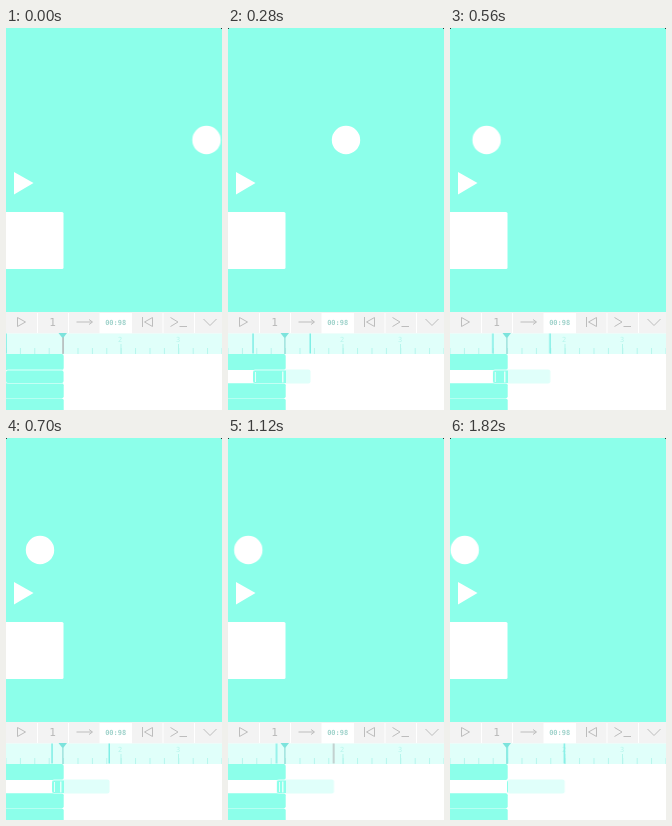
An HTML page for the animation above (1.96 s loop, 216 by 382 pixels).

```html
<!DOCTYPE html>
<html lang="en">
<head>
<meta charset="utf-8">
<title>Timeline drag</title>
<style>
  html, body { margin: 0; width: 100%; height: 100%; overflow: hidden; background: #fff; }
  svg { display: block; width: 100vw; height: 100vh; }

  .aqua { fill: #8cffea; }
  .pale { fill: #e0fffa; }
  .white { fill: #fff; }
  .mark { fill: #7feee5; }
  .icons { fill: none; stroke: #bdbdbd; stroke-width: 1; }
  text { font-family: "DejaVu Sans Mono", monospace; text-anchor: middle; }

  .drag, .ball, .gray-a, .gray-b, .head, .late, .slit { animation: 1960ms infinite; }
  .drag { animation-name: drag; }
  .ball { animation-name: ball; }
  .gray-a { animation-name: gray-a; }
  .gray-b { animation-name: gray-b; }
  .head { animation-name: head; }
  .late { animation-name: late; }
  .slit { animation-name: slit; }

  /* The picture advances on a 70 ms grid, with short holds. */
  @keyframes drag {
    0%      { transform: translateX(0); animation-timing-function: step-end; }
    3.571%  { transform: translateX(0); animation-timing-function: steps(3); }
    14.285% { transform: translateX(25px); animation-timing-function: steps(2); }
    21.428% { transform: translateX(35.5px); animation-timing-function: steps(2); }
    28.571% { transform: translateX(42.8px); animation-timing-function: steps(2); }
    35.714% { transform: translateX(46px); animation-timing-function: step-end; }
    39.285% { transform: translateX(46px); animation-timing-function: steps(3); }
    50%     { transform: translateX(46.8px); animation-timing-function: steps(2); }
    57.142% { transform: translateX(48.5px); animation-timing-function: steps(3); }
    67.857% { transform: translateX(52px); animation-timing-function: step-end; }
    75%     { transform: translateX(53.2px); animation-timing-function: steps(5); }
    92.857%, 100% { transform: translateX(57.2px); animation-timing-function: step-end; }
  }
  @keyframes ball {
    0%      { transform: translateX(200.5px); animation-timing-function: step-end; }
    7.142%  { transform: translateX(191px); animation-timing-function: step-end; }
    10.714% { transform: translateX(162px); animation-timing-function: step-end; }
    14.285% { transform: translateX(118px); animation-timing-function: steps(2); }
    21.428% { transform: translateX(67px); animation-timing-function: steps(2); }
    28.571% { transform: translateX(36.6px); animation-timing-function: steps(2); }
    35.714% { transform: translateX(34px); animation-timing-function: step-end; }
    39.285% { transform: translateX(34px); animation-timing-function: steps(3); }
    50%     { transform: translateX(31.2px); animation-timing-function: steps(2); }
    57.142% { transform: translateX(20.3px); animation-timing-function: steps(3); }
    67.857% { transform: translateX(18.8px); animation-timing-function: step-end; }
    75%     { transform: translateX(18.5px); animation-timing-function: steps(5); }
    92.857%, 100% { transform: translateX(14.7px); animation-timing-function: step-end; }
  }
  @keyframes gray-a {
    0%, 78.571%, 100% { fill: #7feee5; animation-timing-function: step-end; }
    75% { fill: #c4bcc4; animation-timing-function: step-end; }
  }
  @keyframes gray-b {
    0%, 57.142% { fill: #b9c2c2; animation-timing-function: step-end; }
    7.142%, 60.714%, 100% { fill: #7feee5; animation-timing-function: step-end; }
  }
  @keyframes head {
    0% { fill: #b9c2c2; animation-timing-function: step-end; }
    7.142%, 100% { fill: #8fdcd6; animation-timing-function: step-end; }
  }
  @keyframes late {
    0% { opacity: 0; animation-timing-function: step-end; }
    7.142%, 100% { opacity: 1; animation-timing-function: step-end; }
  }
  @keyframes slit {
    0%, 71.428%, 100% { opacity: 0; animation-timing-function: step-end; }
    7.142% { opacity: .75; animation-timing-function: step-end; }
  }
</style>
</head>
<body>
<svg viewBox="0 0 216 382" preserveAspectRatio="none">
  <defs>
    <clipPath id="past"><rect width="57.5" height="382"/></clipPath>
    <pattern id="ticks" x="-.5" y="320" width="14.4" height="6" patternUnits="userSpaceOnUse">
      <rect width="1" height="6" fill="#b5f5ec"/>
    </pattern>
  </defs>

  <!-- stage -->
  <rect class="aqua" width="216" height="284"/>
  <rect x="215" width="1" height="1" fill="#333"/>
  <rect class="late" width="1" height="1" fill="#333"/>
  <rect class="white" x="-3" y="184" width="60.5" height="57" rx="1.5"/>
  <path class="white" d="M8 144L27.5 155L8 166.500Z"/>
  <circle class="ball white" cy="112" r="14.2"/>

  <!-- toolbar -->
  <rect y="284" width="216" height="21.500" fill="#f3f3f3"/>
  <path d="M31.5 285V305M62.5 285V305M157 285V305M188.500 285V305" stroke="#fff"/>
  <rect class="white" x="93.500" y="285" width="32.500" height="20.500"/>
  <g class="icons">
    <path d="M11.500 289.500L19.500 294L11.500 298.500Z"/>
    <path d="M70.500 294H86M83 291.500L86.500 294L83 296.500"/>
    <path d="M136.500 289V299M146.500 289.500L138.500 294L146.500 298.500Z"/>
    <path d="M164.500 289.500L172 294L164.500 298.500M173.500 298.500H181"/>
    <path d="M197.500 291L204 297.500L210.500 291"/>
  </g>
  <text x="46.500" y="298" font-size="11" fill="#b8b8b8">1</text>
  <text x="109.700" y="296.500" font-size="7" font-weight="bold" fill="#9fd2cb">00:98</text>

  <!-- ruler -->
  <rect class="pale" y="305.500" width="216" height="20.500"/>
  <rect y="320" width="216" height="6" fill="url(#ticks)"/>
  <path d="M115 316V326M172.500 316V326" stroke="#b5f5ec"/>
  <g font-size="7" fill="#b5f5ec">
    <text x="114" y="314">2</text>
    <text x="172" y="314">3</text>
  </g>

  <!-- tracks -->
  <g class="aqua">
    <rect x="-3" y="326" width="60.700" height="16" rx="2"/>
    <rect x="-3" y="355.300" width="60.700" height="15" rx="2"/>
    <rect x="-3" y="370.500" width="60.700" height="15" rx="2"/>
  </g>
  <rect class="drag pale" y="341.500" width="57.500" height="14" rx="2"/>
  <g clip-path="url(#past)">
    <g class="drag">
      <rect class="aqua" y="342.500" width="57.500" height="12.500" rx="2"/>
      <rect class="slit white" x="2" y="344" width="1" height="10"/>
    </g>
  </g>
  <rect class="slit white" x="54" y="343.500" width="1.500" height="11"/>

  <!-- markers and playhead -->
  <rect class="head" x="56.300" y="307" width="1.200" height="19"/>
  <g class="drag">
    <rect class="mark gray-a" x="-.7" y="305.500" width="1.500" height="20"/>
    <rect class="mark gray-b" x="56.500" y="305.500" width="1.500" height="20"/>
  </g>
  <path d="M52.500 305H61L57.500 309.500H56Z" fill="#7ce3dc"/>
</svg>
</body>
</html>
```
